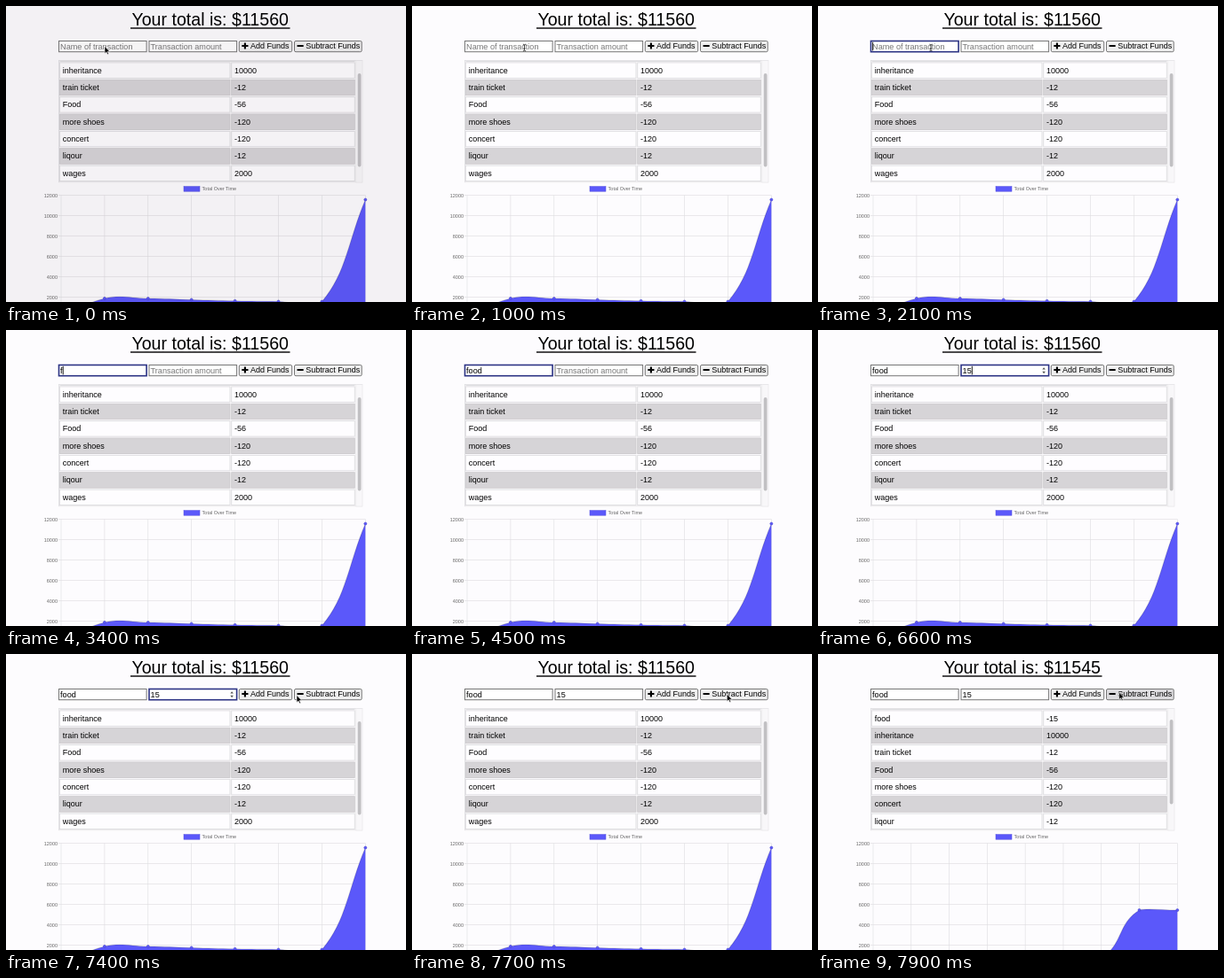
An HTML page for the animation above (8 s loop, 450 px wide and 334 px high).

```html
<!DOCTYPE html>
<html lang="en">
<head>
<meta charset="utf-8">
<title>Budget tracker</title>
<style>
  html, body { margin: 0; width: 100%; height: 100%; overflow: hidden; background: #fdfcfe; }
  svg { display: block; width: 450px; height: 334px; font: 9px "Liberation Sans", Arial, sans-serif; }
  .hint { fill: #757575; }
  .axis { font-size: 5.5px; fill: #666; }
</style>
</head>
<body>
<svg id="stage" viewBox="0 0 450 334"></svg>
<script>
const LOOP = 8000, STEP = 100, UPDATE = 7800;
const BLUE = '#5b58fa', BASE = 351.5, UNIT = 11.5 / 1000;
const LEFT = 62, RIGHT = 404.3, TOP = 213.5;
const stage = document.getElementById('stage');

function add(tag, attrs, parent = stage, text) {
  const el = document.createElementNS('http://www.w3.org/2000/svg', tag);
  for (const k in attrs) el.setAttribute(k, attrs[k]);
  if (text !== undefined) el.textContent = text;
  parent.appendChild(el);
  return el;
}
const set = (el, attrs) => { for (const k in attrs) el.setAttribute(k, attrs[k]); };
const show = (el, on) => el.setAttribute('visibility', on ? 'visible' : 'hidden');
const box = (x, y, width, height, fill, more, parent) =>
  add('rect', { x, y, width, height, fill, ...more }, parent);
const label = (x, y, text, more, parent) => add('text', { x, y, ...more }, parent, text);

// Heading
const title = label(229.7, 22.3, '', { 'text-anchor': 'middle', 'font-size': 19.6 });
box(140, 24.3, 179.5, 1.4, '#000');

// Form
function field(x, hint) {
  const frame = box(x, 39.5, 98.6, 12.2, '#fff', { stroke: '#767676' });
  const ph = label(x + 1.6, 48.6, hint, { class: 'hint', 'font-size': 9.1 });
  const value = label(x + 1.6, 48.6, '', { 'font-size': 9.1 });
  const caret = box(x, 40.8, 0.9, 9.6, '#000');
  return (text, focus, blink) => {
    set(frame, focus ? { stroke: '#2c3384', 'stroke-width': 1.6 } : { stroke: '#767676', 'stroke-width': 1 });
    show(ph, !text);
    if (value.textContent !== text) value.textContent = text;
    show(caret, focus && blink);
    if (focus) set(caret, { x: x + 1.7 + (text ? value.getComputedTextLength() : 0) });
  };
}
const nameField = field(59.5, 'Name of transaction');
const amountField = field(161, 'Transaction amount');
const spinner = add('path', { d: 'M252.3 44.6l1.8-2.4 1.8 2.4zM252.3 46.8h3.6l-1.8 2.4z', fill: '#555' });

function button(x, width, text, textX, plus) {
  const b = box(x, 39.5, width, 12.2, '#efefef', { rx: 1.5, stroke: '#767676' });
  const ix = textX - 9.7;
  box(ix, 44, 7.2, 2.1, '#000', { rx: 0.5 });
  if (plus) box(ix + 2.55, 41.4, 2.1, 7.2, '#000', { rx: 0.5 });
  label(textX, 48.4, text);
  return b;
}
button(262.3, 59.4, 'Add Funds', 275, true);
const subtract = button(324.5, 75.7, 'Subtract Funds', 337.2, false);

// Table
box(59, 61, 342, 138, '#fdfcfe');
box(59, 61, 342, 1, '#e4e3e6');
box(59, 61, 0.8, 138, '#dddce0');
box(60.5, 62, 332, 0.8, '#d8d7da');
const ROWS = [['food', -15], ['inheritance', 10000], ['train ticket', -12], ['Food', -56],
  ['more shoes', -120], ['concert', -120], ['liqour', -12], ['wages', 2000]];
const cells = [];
for (let i = 0; i < 7; i++) {
  const y = 63.9 + i * 19.36, fill = i % 2 ? '#d6d4d7' : '#fefdff';
  const line = { stroke: i % 2 ? '#cccacd' : '#dcdbde', 'stroke-width': 0.9 };
  box(60.4, y, 191.6, 17.5, fill, line);
  box(253.7, y, 138.6, 17.5, fill, line);
  cells.push([label(63.8, y + 11.7, ''), label(257, y + 11.7, '')]);
}
box(59, 198.4, 342, 0.8, '#e4e3e6');
box(393.8, 61.5, 7.2, 137.5, '#f8f7f9', { stroke: '#e6e5e8', 'stroke-width': 0.6 });
const thumb = box(395.7, 76, 3.8, 105, '#c1c0c3', { rx: 1.9 });

// Chart
box(200, 203.6, 18, 5.6, BLUE, { stroke: '#504dde', 'stroke-width': 0.5 });
label(220.6, 208.4, 'Total Over Time', { class: 'axis' });
for (let v = 2000; v <= 12000; v += 2000) {
  const y = BASE - v * UNIT;
  label(58, y + 2, v, { class: 'axis', 'text-anchor': 'end' });
  box(58.5, y - 0.3, RIGHT - 58.5, 0.6, '#dedde0');
}

function chart(values) {
  const g = add('g', {});
  const gap = (RIGHT - LEFT) / (values.length - 1);
  const pts = values.map((v, i) => [LEFT + i * gap, BASE - v * UNIT]);
  pts.forEach(p => box(p[0] - 0.3, TOP, 0.6, 125, '#dedde0', {}, g));
  const area = add('path', { fill: BLUE }, g);
  const curve = add('path', { fill: 'none', stroke: '#000', 'stroke-opacity': 0.12, 'stroke-width': 1.3 }, g);
  const dots = pts.map(p => add('circle', { cx: p[0], r: 1.5, fill: BLUE, stroke: '#4744cf', 'stroke-width': 0.6 }, g));

  // Spline handles with tension 0.4, kept inside the plot
  const handles = pts.map((c, i) => {
    const a = pts[i - 1] || c, b = pts[i + 1] || c;
    const da = Math.hypot(c[0] - a[0], c[1] - a[1]), db = Math.hypot(b[0] - c[0], b[1] - c[1]);
    const at = f => [c[0] + f * (b[0] - a[0]), Math.max(TOP, c[1] + f * (b[1] - a[1]))];
    return [at(-0.4 * da / (da + db)), at(0.4 * db / (da + db))];
  });
  return (on, grow) => {
    g.setAttribute('display', on ? 'inline' : 'none');
    if (!on) return;
    const put = p => p[0].toFixed(2) + ' ' + (BASE + (p[1] - BASE) * grow).toFixed(2);
    let d = 'M' + put(pts[0]);
    for (let i = 1; i < pts.length; i++)
      d += 'C' + [handles[i - 1][1], handles[i][0], pts[i]].map(put).join(' ');
    set(curve, { d });
    set(area, { d: d + `L${RIGHT} ${BASE}L${LEFT} ${BASE}Z` });
    dots.forEach((dot, i) => set(dot, { cy: BASE + (pts[i][1] - BASE) * grow }));
  };
}
const totals = [-120, 1880, 1868, 1748, 1628, 1572, 1560, 11560];
const before = chart(totals);
const after = chart([...totals, 11545]);

// Pointer
const arrow = add('path', {
  d: 'M0 0V8.2L1.9 6.5 3.2 9.3 4.5 8.7 3.2 6H5.8Z',
  fill: '#000', stroke: '#fff', 'stroke-width': 0.6
});
const beam = add('path', {
  d: 'M-1.6-3.8Q0-3.8 0-2.8Q0-3.8 1.6-3.8M0-2.8V2.8M-1.6 3.8Q0 3.8 0 2.8Q0 3.8 1.6 3.8M-.9.9H.9',
  fill: 'none', stroke: '#222', 'stroke-width': 0.8
});
const PATH = [
  [0, 111, 45.4], [500, 111, 45.4], [800, 120, 46.5], [1000, 126.5, 47], [1200, 127, 47],
  [4800, 127, 47], [5000, 150, 46.5], [5300, 207, 45.5], [5500, 212, 45.5],
  [6600, 212, 45.5], [6800, 232, 46], [7100, 314, 47], [7300, 314, 47],
  [7600, 353, 45.5], [7700, 354.3, 45.3], [7900, 338.7, 43.2]
];
function pointerAt(t) {
  const i = PATH.findIndex(p => p[0] >= t);
  if (i < 1) return PATH[0].slice(1);
  const a = PATH[i - 1], b = PATH[i], f = (t - a[0]) / (b[0] - a[0]);
  return [a[1] + (b[1] - a[1]) * f, a[2] + (b[2] - a[2]) * f];
}

const veil = box(0, 0, 450, 334, '#281e32');

// Step tables: [time, value]
const at = (steps, t) => steps.reduce((v, s) => t >= s[0] ? s[1] : v, steps[0][1]);
const NAME = [[0, ''], [3400, 'f'], [3500, 'fo'], [3600, 'foo'], [4000, 'food']];
const AMOUNT = [[0, ''], [6200, '1'], [6600, '15']];
const FOCUS = [[0, 0], [1100, 1], [5600, 2], [7600, 0]];
const BLINK = [[0, 1], [1600, 0], [2100, 1], [2600, 0], [3100, 1], [4500, 0], [5000, 1],
  [5500, 0], [5600, 1], [6100, 0], [6200, 1], [7100, 0]];
const POINTER = [[0, 'arrow'], [600, 'beam'], [3400, ''], [4900, 'beam'], [6200, ''], [6700, 'beam'], [6900, 'arrow']];
const VEIL = [[0, 0.048], [100, 0.018], [300, 0]];

function draw(t) {
  const done = t >= UPDATE, focus = at(FOCUS, t), blink = at(BLINK, t);
  title.textContent = 'Your total is: $' + (done ? 11545 : 11560);
  nameField(at(NAME, t), focus === 1, blink);
  amountField(at(AMOUNT, t), focus === 2, blink);
  show(spinner, t >= 5100 && t < 7600);
  set(subtract, { fill: done ? '#dcdbde' : '#efefef' });
  cells.forEach((pair, i) => pair.forEach((c, k) => { c.textContent = ROWS[i + (done ? 0 : 1)][k]; }));
  set(thumb, done ? { y: 74, height: 95.5 } : { y: 76, height: 105.5 });
  before(!done, 1);
  after(done, 1 - (1 - (t - 7753) / 1000) ** 4);

  const [x, y] = pointerAt(t), kind = at(POINTER, t);
  show(arrow, kind === 'arrow');
  show(beam, kind === 'beam');
  for (const p of [arrow, beam]) set(p, { transform: `translate(${x} ${y})` });
  set(veil, { opacity: at(VEIL, t) });
}

const start = performance.now();
let last = -1;
function tick() {
  const t = Math.floor((performance.now() - start) % LOOP / STEP) * STEP;
  if (t !== last) draw(last = t);
  requestAnimationFrame(tick);
}
tick();
</script>
</body>
</html>
```
